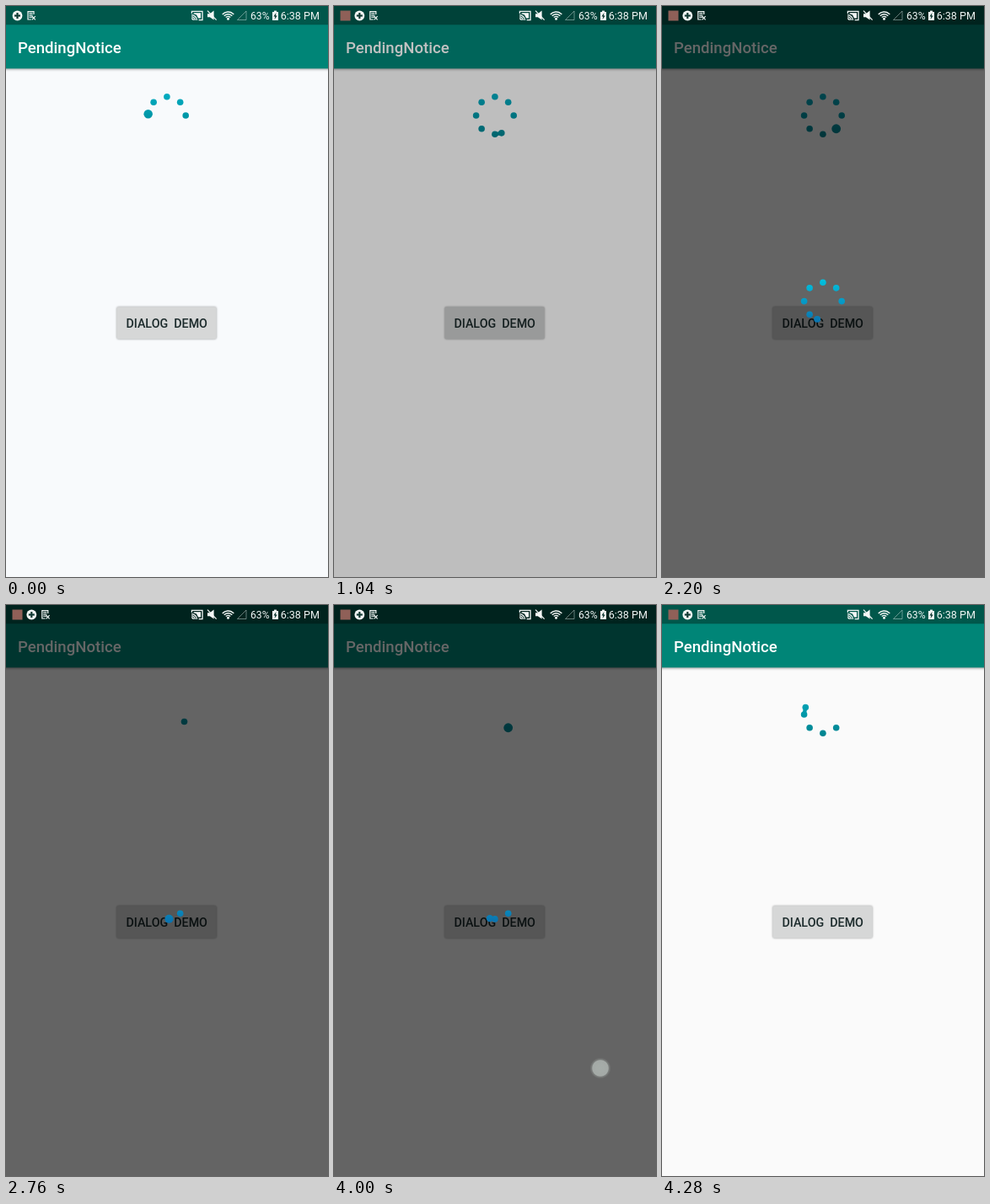
Write an HTML page with a canvas that moves like this. It is 382 by 678 pixels and loops after 4.32 s.

```html
<!DOCTYPE html>
<html lang="en">
<head>
<meta charset="utf-8">
<title>Loader demo</title>
<style>
  html, body { margin: 0; width: 100%; height: 100%; overflow: hidden; }
  body { position: relative; background: #fafafa; font-family: Roboto, "Noto Sans", sans-serif; }
  body > * { position: absolute; white-space: pre; }
  svg, canvas { left: 0; top: 0; width: 382px; height: 678px; }
  svg text { font-family: Roboto, "Noto Sans", sans-serif; font-weight: 500; }
  #bar { filter: drop-shadow(0 1px 1.4px rgba(0, 0, 0, .36)); }
  #button { filter: drop-shadow(0 .8px .8px rgba(0, 0, 0, .36)); }
  .info { top: 1px; line-height: 22px; color: #f4f7f6; }
  #charge { left: 290px; font-size: 12.2px; }
  #clock { right: calc(100% - 372px); font-size: 12.6px; }
</style>
</head>
<body>
<svg viewBox="0 0 382 678">
  <rect id="bar" x="-10" width="402" height="74.28" fill="#008577"/>
  <rect width="382" height="22.28" fill="#00574b"/>
  <text x="14" y="55.5" font-size="18.58" fill="#fff">PendingNotice</text>
  <rect id="button" x="131.4" y="357.2" width="118.2" height="38.2" rx="2" fill="#d6d7d7"/>
  <text x="190.7" y="382" font-size="14.25" text-anchor="middle" fill="#1b2a2b">DIALOG&nbsp;&nbsp;DEMO</text>
</svg>
<canvas id="stage"></canvas>
<div id="charge" class="info">63%</div>
<div id="clock" class="info">6:38 PM</div>
<script>
const W = 382, H = 678, LOOP = 4320, STEP = 40;
const TAU = Math.PI * 2, WHITE = '#f4f7f6';
const stage = document.getElementById('stage');
const ctx = stage.getContext('2d');
const dpr = window.devicePixelRatio || 1;
stage.width = W * dpr;
stage.height = H * dpr;
ctx.scale(dpr, dpr);

// [time, position on the 16-step cycle]
const PAGE_PATH = [[0, 3.1], [1040, 16.54], [1400, 21.17], [2200, 32], [3320, 47], [4000, 56], [4280, 59.5]];
const DIALOG_PATH = [[1400, 6.5], [2200, 17.39], [3320, 32.32], [4000, 41.35]];

const ramp = (t, a, b) => Math.min(1, Math.max(0, (t - a) / (b - a)));

// Linear between the keys, extended beyond both ends
function along(keys, t) {
  let i = 1;
  while (i < keys.length - 1 && t > keys[i][0]) i++;
  const [t0, p0] = keys[i - 1], [t1, p1] = keys[i];
  return p0 + (p1 - p0) * (t - t0) / (t1 - t0);
}

function disc(x, y, r) {
  ctx.beginPath();
  ctx.arc(x, y, r, 0, TAU);
  ctx.fill();
}

function line(points, close) {
  ctx.beginPath();
  points.forEach(([x, y]) => ctx.lineTo(x, y));
  if (close) ctx.closePath();
}

// A ball circles eight places: it collects the dots on one turn and lays them down on the next.
function loader(cx, cy, pos, top, bottom) {
  const R = 22.3, DOT = 3.8;
  const q = ((pos % 16) + 16) % 16;
  const place = n => {
    const a = (n + 1) * TAU / 8;
    return [cx + R * Math.cos(a), cy + R * Math.sin(a)];
  };
  const paint = ctx.createLinearGradient(0, cy - R - 4, 0, cy + R + 4);
  paint.addColorStop(0, top);
  paint.addColorStop(1, bottom);
  ctx.fillStyle = ctx.strokeStyle = paint;
  ctx.lineWidth = 4.4;

  const [bx, by] = place(q);
  for (let n = 0; n < 8; n++) {
    if (q < 8 ? n < q : n > q - 8) continue;
    const [x, y] = place(n);
    disc(x, y, DOT);
    if (Math.hypot(x - bx, y - by) < 10) {
      line([[x, y], [bx, by]]);
      ctx.stroke();
    }
  }
  disc(bx, by, DOT + 1.6 * Math.cos(Math.PI * q) ** 2);
}

function plusIcon(x) {
  ctx.fillStyle = WHITE;
  disc(x, 11.5, 5.9);
  ctx.fillStyle = '#123a34';
  ctx.fillRect(x - 3.5, 10.4, 7, 2.2);
  ctx.fillRect(x - 1.1, 8, 2.2, 7);
}

function sheetIcon(x) {
  ctx.strokeStyle = WHITE;
  ctx.lineWidth = 1.2;
  line([[x + 3.2, 10], [x + 3.2, 6.6], [x - 3.8, 6.6], [x - 3.8, 16], [x, 16]]);
  ctx.stroke();
  for (const y of [8.8, 11, 13.2]) {
    line([[x - 2.4, y], [x + 1.8, y]]);
    ctx.stroke();
  }
  line([[x + 1, 12.2], [x + 5, 16.4]]);
  ctx.stroke();
  line([[x + 5, 12.2], [x + 1, 16.4]]);
  ctx.stroke();
}

function castIcon() {
  ctx.strokeStyle = ctx.fillStyle = WHITE;
  ctx.lineWidth = 1.3;
  line([[220.4, 9], [220.4, 6.3], [233, 6.3], [233, 16.6], [228.6, 16.6]]);
  ctx.stroke();
  line([[222.5, 8.3], [231, 8.3], [231, 14.6], [228, 14.6], [226, 10.6], [222.5, 9.2]], true);
  ctx.fill();
  for (const r of [2.2, 4.2, 6.4]) {
    ctx.beginPath();
    ctx.arc(220, 17, r, -Math.PI / 2, 0);
    ctx.stroke();
  }
}

function muteIcon() {
  ctx.fillStyle = ctx.strokeStyle = WHITE;
  line([[239, 9.2], [241.8, 9.2], [246.6, 5.4], [246.6, 16.6], [241.8, 13.2], [239, 13.2]], true);
  ctx.fill();
  ctx.lineWidth = 1.3;
  line([[239, 5.6], [249.6, 16.6]]);
  ctx.stroke();
}

function wifiIcon() {
  ctx.strokeStyle = ctx.fillStyle = WHITE;
  ctx.lineWidth = 1.5;
  for (const r of [3.6, 6.3, 9]) {
    ctx.beginPath();
    ctx.arc(263.5, 16, r, -Math.PI * .77, -Math.PI * .23);
    ctx.stroke();
  }
  disc(263.5, 15.2, 1.5);
}

function signalIcon() {
  ctx.strokeStyle = 'rgba(244,247,246,.42)';
  ctx.lineWidth = 1;
  line([[274.5, 16.5], [285, 16.5], [285, 6]], true);
  ctx.stroke();
}

function batteryIcon() {
  ctx.fillStyle = WHITE;
  ctx.fillRect(316, 7, 7, 10);
  ctx.fillRect(318, 5.6, 3, 2);
  ctx.fillStyle = '#123a34';
  line([[320.4, 8], [317.4, 12.6], [319.2, 12.6], [318.6, 16], [321.8, 11.4], [320, 11.4]], true);
  ctx.fill();
}

function statusIcons(t) {
  let x = 13.5;
  if (t >= 280) {
    ctx.fillStyle = '#8f6058';
    ctx.fillRect(7.5, 5.5, 12, 12);
    x = 30.3;
  }
  plusIcon(x);
  sheetIcon(x + 16.3);
  castIcon();
  muteIcon();
  wifiIcon();
  signalIcon();
  batteryIcon();
}

function touch() {
  const glow = ctx.createRadialGradient(316, 550, 0, 316, 550, 12.5);
  glow.addColorStop(0, 'rgba(205,216,210,.62)');
  glow.addColorStop(.74, 'rgba(205,214,209,.6)');
  glow.addColorStop(.82, 'rgba(190,200,194,.25)');
  glow.addColorStop(1, 'rgba(190,200,194,0)');
  ctx.fillStyle = glow;
  disc(316, 550, 12.5);
}

function draw(t) {
  document.body.style.backgroundColor = t < 960 ? '#f8fafc' : '#fafafa';
  ctx.clearRect(0, 0, W, H);

  const pressed = ramp(t, 880, 960) * (1 - ramp(t, 1000, 1200));
  ctx.fillStyle = `rgba(0,0,0,${.07 * pressed})`;
  ctx.fillRect(131.4, 357.2, 118.2, 38.2);

  loader(190.9, 130, along(PAGE_PATH, t), '#00acc1', '#00838f');

  const shown = ramp(t, 960, 1160) * (1 - ramp(t, 4040, 4240));
  ctx.fillStyle = `rgba(0,0,0,${.6 * shown})`;
  ctx.fillRect(0, 0, W, H);

  const dialog = ramp(t, 1060, 1200) * (1 - ramp(t, 4040, 4200));
  if (dialog > 0) {
    ctx.globalAlpha = dialog;
    loader(190.9, 350.6, along(DIALOG_PATH, t), '#00c2de', '#0c72ae');
    ctx.globalAlpha = 1;
  }

  if (t >= 3880 && t < 4080) touch();
  statusIcons(t);
}

const start = performance.now();
function tick() {
  const t = (performance.now() - start) % LOOP;
  draw(Math.floor(t / STEP) * STEP);
  requestAnimationFrame(tick);
}
tick();
</script>
</body>
</html>
```
